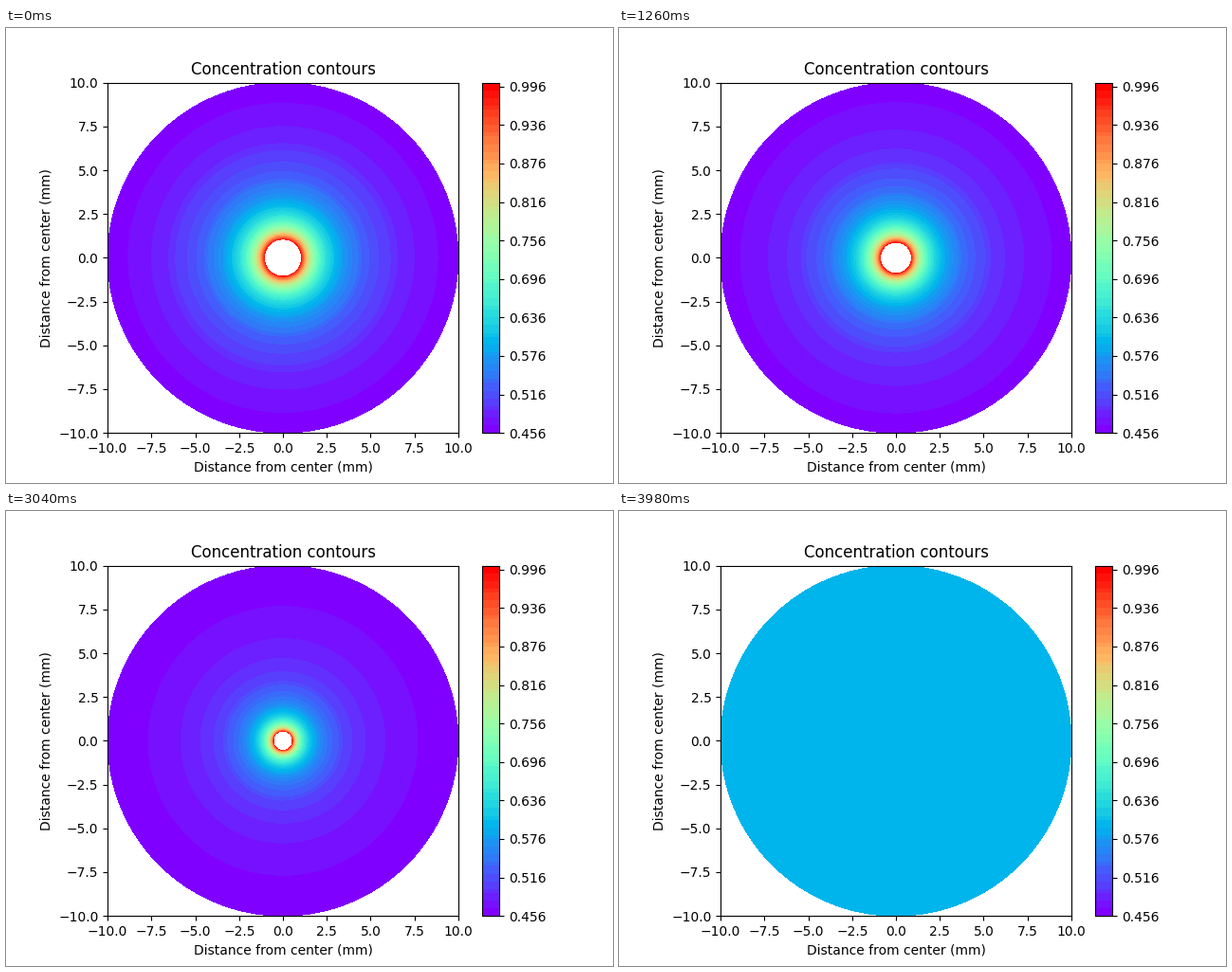
Recreate the animation shown at these times as a matplotlib script. Size 640 by 480 pixels, loop 4 s.

```python
import numpy as np
import matplotlib.pyplot as plt
from matplotlib.animation import FuncAnimation
from matplotlib.cm import ScalarMappable
from matplotlib.collections import PolyCollection
from matplotlib.colors import BoundaryNorm, ListedColormap

FRAMES, INTERVAL = 200, 20
C_FAR, C_SURFACE = 0.4, 1.0
R_MAX = 10.0
STEP, TOP = 0.006, 167  # level spacing and index of the highest level

plt.rcParams["font.family"] = "DejaVu Sans"
cmap = plt.get_cmap("rainbow", 52)
angle = np.linspace(0, 2 * np.pi, 200)
unit = np.column_stack([np.cos(angle), np.sin(angle)])


def core_radius(i):
    """Radius of the dissolving core: its area shrinks at a constant rate."""
    return np.sqrt(1 - i / (FRAMES - 1))


def level_range(radius):
    edge = C_FAR + (C_SURFACE - C_FAR) * radius / R_MAX
    return np.arange(int(edge / STEP), TOP + 1)


def layer_colors(count):
    return cmap(np.arange(count) / (count - 1))


def discs(radius):
    """Nested discs for c(r) = C_FAR + (C_SURFACE - C_FAR) * radius / r."""
    levels = level_range(radius)[:-1]
    excess = np.maximum(levels * STEP - C_FAR, 1e-9)
    radii = np.minimum((C_SURFACE - C_FAR) * radius / excess, R_MAX)
    radii[0] = R_MAX
    verts = [r * unit for r in radii] + [radius * unit]
    return verts, np.vstack([layer_colors(len(levels)), (1, 1, 1, 1)])


fig, ax = plt.subplots(figsize=(6.4, 4.8), dpi=100)
ax.set(xlim=(-R_MAX, R_MAX), ylim=(-R_MAX, R_MAX), aspect="equal",
       title="Concentration contours",
       xlabel="Distance from center (mm)", ylabel="Distance from center (mm)")
ticks = np.linspace(-R_MAX, R_MAX, 9)
ax.set_xticks(ticks)
ax.set_yticks(ticks)

field = PolyCollection([], antialiased=False, edgecolors="none",
                       linewidths=0, zorder=1)
ax.add_collection(field, autolim=False)

levels = level_range(1.0) * STEP
norm = BoundaryNorm(levels, len(levels) - 1)
bar_cmap = ListedColormap(layer_colors(len(levels) - 1))
bar = fig.colorbar(ScalarMappable(norm, bar_cmap), ax=ax,
                   ticks=levels[::10], format="%.3f")
bar.minorticks_off()


def update(i):
    radius = core_radius(i)
    if radius > 0:
        verts, colors = discs(radius)
    else:
        verts, colors = [R_MAX * unit], [plt.get_cmap("rainbow")(0.25)]
    field.set_verts(verts)
    field.set_facecolor(colors)
    return [field]


anim = FuncAnimation(fig, update, frames=FRAMES, interval=INTERVAL,
                     repeat=True, repeat_delay=0)
plt.show()
```
